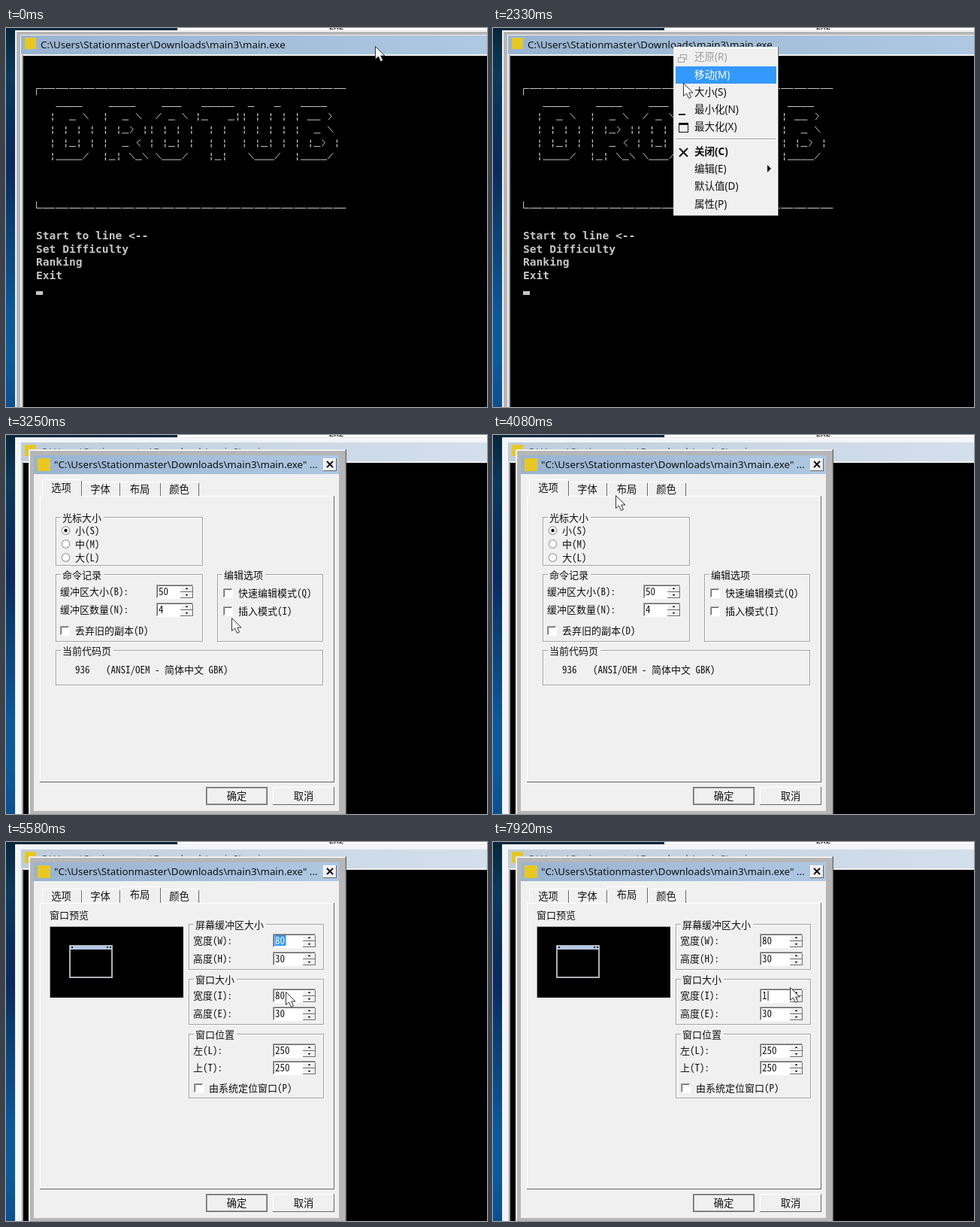
Write an HTML page with a canvas that moves like this. It is 640 px wide and 504 px high and loops after 8 s.

```html
<!DOCTYPE html>
<html lang="zh-CN">
<head>
<meta charset="utf-8">
<style>
html, body { margin: 0; overflow: hidden; background: #000; }
canvas { display: block; }
</style>
</head>
<body>
<canvas id="stage" width="640" height="504"></canvas>
<script>
const g = document.getElementById('stage').getContext('2d');
const FACE = '#f0f0f0', LIGHT = '#fff', EDGE = '#b6b6b6', SHADE = '#a0a0a0', DARK = '#666';
const INK = '#101010', TERM = '#c6c6c6', BLUE = '#3399ff', ICON = '#e8c820';
const UI = '"Noto Sans","Noto Sans CJK SC","Noto Sans CJK",sans-serif';
const FORM = '"Noto Sans Mono CJK SC","Noto Sans CJK SC","Noto Sans CJK",monospace';
const PATH = 'C:\\Users\\Stationmaster\\Downloads\\main3\\main.exe';

const BANNER = [
  '   ____    ____    ___   _____  _   _   ____',
  '  |  _ \\  |  _ \\  / _ \\ |_   _|| | | | | __ )',
  '  | | | | | |_) || | | |  | |  | | | | |  _ \\',
  '  | |_| | |  _ < | |_| |  | |  | |_| | | |_) |',
  '  |____/  |_| \\_\\ \\___/   |_|   \\___/  |____/'
];
const MENU = [
  [38, '还原(R)'], [62, '移动(M)'], [85, '大小(S)'], [108, '最小化(N)'], [131, '最大化(X)'],
  [164, '关闭(C)'], [187, '编辑(E)'], [210, '默认值(D)'], [234, '属性(P)']
];
// pointer tip: time, x, y
const TRACK = [
  [0, 491, 24], [250, 494, 42], [417, 494, 42], [1415, 240, 24],
  [2167, 240, 24], [2915, 300, 243], [3417, 300, 243], [4083, 163, 80], [4250, 180, 73],
  [4750, 180, 72], [5583, 372, 199], [6083, 305, 199], [6167, 305, 199],
  [6666, 338, 198], [6833, 400, 230], [7000, 435, 202], [7833, 398, 195], [7915, 395, 193]
];

function pointerAt(t) {
  const i = TRACK.findIndex(k => k[0] > t);
  if (i < 0) return TRACK[TRACK.length - 1].slice(1);
  const [t0, x0, y0] = TRACK[i - 1], [t1, x1, y1] = TRACK[i];
  const f = (t - t0) / (t1 - t0);
  return [Math.round(x0 + (x1 - x0) * f), Math.round(y0 + (y1 - y0) * f)];
}

function rect(x, y, w, h, color) {
  g.fillStyle = color;
  g.fillRect(x, y, w, h);
}

function frame(x, y, w, h, color) {
  g.strokeStyle = color;
  g.lineWidth = 1;
  g.strokeRect(x + .5, y + .5, w - 1, h - 1);
}

function bevel(x, y, w, h, fill, topLeft, bottomRight) {
  rect(x, y, w, h, bottomRight);
  rect(x, y, w - 1, h - 1, topLeft);
  rect(x + 1, y + 1, w - 2, h - 2, fill);
}

function line(points, color, width = 1) {
  g.strokeStyle = color;
  g.lineWidth = width;
  g.beginPath();
  points.forEach(([x, y]) => g.lineTo(x, y));
  g.stroke();
}

// y is the vertical middle of the line
function text(s, x, y, font, color = INK, align = 'left') {
  g.font = font;
  g.fillStyle = color;
  g.textAlign = align;
  g.fillText(s, x, y + 5);
}

const label = (s, x, y, color) => text(s, x, y, '13px ' + FORM, color);

function titleBar(x, y, w, h, active) {
  const grad = g.createLinearGradient(x, 0, x + w, 0);
  grad.addColorStop(0, active ? '#99b4d1' : '#bfcddb');
  grad.addColorStop(1, active ? '#aec8e2' : '#d3dfec');
  rect(x, y, w, h, grad);
}

function desktop() {
  const grad = g.createLinearGradient(0, 0, 0, 504);
  ['#06263c', '#0a3a5c', '#08305c', '#0a2a60', '#083e70', '#0a4a84', '#0a589c', '#0a5a9e', '#0a5090']
    .forEach((c, i) => grad.addColorStop(i / 8, c));
  rect(0, 0, 640, 504, grad);
  rect(228, 0, 412, 3, '#fff');
  text('zxz', 430, -3, '13px ' + UI);
}

function banner() {
  const cw = 8.8;
  BANNER.forEach((row, r) => {
    const b = 104.5 + r * 17.65;
    [...row].forEach((c, i) => {
      const x = 40 + i * cw, m = x + cw / 2;
      if (c === '_') line([[x, b], [x + cw, b]], TERM);
      if (c === '/') line([[x + 1, b - 1], [x + 8, b - 9]], TERM);
      if (c === '\\') line([[x + 1, b - 9], [x + 8, b - 1]], TERM);
      if (c === '|') {
        line([[m, b - 9], [m, b - 5]], TERM, 1.3);
        line([[m, b - 3], [m, b + 1]], TERM, 1.3);
      }
      if (c === ')') line([[x + 2, b - 9], [x + 6, b - 5], [x + 2, b]], TERM);
      if (c === '<') line([[x + 7, b - 9], [x + 2, b - 5], [x + 7, b]], TERM);
    });
  });
}

function consoleWindow(active) {
  const edge = active ? EDGE : '#f2f5fa';
  rect(12, 3, 628, 501, '#e3e3e3');
  rect(13, 4, 627, 500, LIGHT);
  rect(14, 5, 626, 499, edge);
  rect(19, 9, 621, 495, FACE);
  titleBar(20, 10, 620, 25, active);
  rect(21, 35, 619, 2, FACE);
  rect(21, 36, 2, 468, SHADE);
  rect(23, 37, 617, 467, '#000');
  rect(25, 13, 15, 15, ICON);
  text(PATH, 46, 22, '13.3px ' + UI, active ? INK : '#434e54');

  for (const [y, d] of [[80.5, 9], [239.5, -9]]) {
    line([[40.5, y + d], [40.5, y], [48, y]], TERM);
    for (let x = 48.8; x < 445; x += 17.6) line([[x, y], [x + 16.4, y]], TERM);
  }
  banner();
  ['Start to line <--', 'Set Difficulty', 'Ranking', 'Exit'].forEach((s, i) =>
    text(s, 40, 276 + i * 17.65, 'bold 14.6px "DejaVu Sans Mono",monospace', TERM));
  rect(40, 350, 9, 5, TERM);
}

function menu(px, py, alpha) {
  g.globalAlpha = alpha;
  bevel(240, 25, 140, 225, FACE, '#e3e3e3', DARK);
  frame(241, 26, 138, 223, LIGHT);
  MENU.forEach(([y, s], i) => {
    const last = i === MENU.length - 1;
    const hot = i > 0 && px >= 242 && Math.abs(py - (last ? 238 : y)) < (last ? 16 : 11.6);
    if (hot) rect(243, y - 11, 134, 23, BLUE);
    text(s, 268, y, (i === 5 ? 'bold ' : '') + '13.5px ' + UI, hot ? '#fff' : i ? INK : SHADE);
  });
  frame(249, 35, 9, 7, SHADE);
  bevel(246, 39, 9, 7, FACE, SHADE, SHADE);
  rect(247, 114, 9, 2, INK);
  frame(247, 126, 13, 13, INK);
  rect(247, 126, 13, 3, INK);
  line([[248, 160], [259, 171]], INK, 2);
  line([[259, 160], [248, 171]], INK, 2);
  rect(244, 147, 132, 1, SHADE);
  rect(244, 148, 132, 1, LIGHT);
  g.fillStyle = INK;
  g.beginPath();
  g.moveTo(365, 182);
  g.lineTo(370, 187);
  g.lineTo(365, 192);
  g.fill();
  g.globalAlpha = 1;
}

function group(x, y, w, h, s) {
  frame(x + 1, y + 1, w, h, LIGHT);
  frame(x, y, w, h, SHADE);
  rect(x + 7, y - 2, [...s].length * 13 + 5, 5, FACE);
  label(s, x + 9, y + 1);
}

function sunken(x, y, w, h) {
  bevel(x, y, w, h, '#fff', SHADE, LIGHT);
  line([[x + 1.5, y + h - 2], [x + 1.5, y + 1.5], [x + w - 2, y + 1.5]], DARK);
}

function spin(x, y, w, value, selected = 0, caret = false) {
  sunken(x, y - 9, w, 19);
  for (const [top, d] of [[y - 7, -1], [y + 1, 1]]) {
    bevel(x + w - 18, top, 17, 8, FACE, LIGHT, DARK);
    rect(x + w - 11, top + 3, 3, 1, INK);
    rect(x + w - 10, top + 3 + d, 1, 1, INK);
  }
  const from = value.length - selected;
  if (selected) rect(x + 2.5 + from * 6.5, y - 7, selected * 6.5 + 2, 14, BLUE);
  [...value].forEach((c, i) => label(c, x + 3 + i * 6.5, y, selected && i >= from ? '#fff' : INK));
  if (caret) rect(x + 4 + value.length * 6.5, y - 6, 1, 13, INK);
}

function checkbox(x, y, s) {
  sunken(x, y - 6, 13, 13);
  label(s, x + 20, y);
}

function radio(y, s, on) {
  g.fillStyle = '#fff';
  g.strokeStyle = SHADE;
  g.lineWidth = 1.2;
  g.beginPath();
  g.arc(79.5, y, 5.3, 0, 7);
  g.fill();
  g.stroke();
  if (on) {
    g.fillStyle = INK;
    g.beginPath();
    g.arc(79.5, y, 2.2, 0, 7);
    g.fill();
  }
  label(s, 92, y);
}

function button(x, s, main) {
  bevel(x, 468, 82, 24, FACE, LIGHT, DARK);
  frame(x + 1, 469, 80, 22, main ? SHADE : FACE);
  if (main) frame(x, 468, 82, 24, DARK);
  text(s, x + 41, 480, '13.3px ' + FORM, INK, 'center');
}

function optionsPage() {
  group(66, 109, 196, 65, '光标大小');
  radio(127, '小(S)', true);
  radio(145, '中(M)');
  radio(163, '大(L)');
  group(66, 185, 196, 90, '命令记录');
  label('缓冲区大小(B):', 72, 208);
  label('缓冲区数量(N):', 72, 232);
  spin(200, 208, 50, '50');
  spin(200, 232, 50, '4');
  checkbox(72, 260, '丢弃旧的副本(D)');
  group(281, 185, 141, 90, '编辑选项');
  checkbox(289, 210, '快速编辑模式(Q)');
  checkbox(289, 234, '插入模式(I)');
  group(66, 286, 356, 47, '当前代码页');
  label('936', 92, 312);
  label('(ANSI/OEM - 简体中文 GBK)', 133, 312);
}

function layoutPage(t, px) {
  label('窗口预览', 58, 97);
  bevel(58, 112, 179, 96, '#000', SHADE, LIGHT);
  g.strokeStyle = '#b0b0b8';
  g.lineWidth = 2;
  g.strokeRect(85, 138, 56, 42);
  rect(85, 138, 56, 5, '#b4c8e4');
  for (const x of [87, 134, 138]) rect(x, 139, 2, 2, INK);

  const focusSize = t >= 5660, typed = t >= 7575;
  const picked = t >= 6080 || px < 361 ? 2 : px < 367 ? 1 : 0;
  group(243, 109, 180, 61, '屏幕缓冲区大小');
  label('宽度(W):', 249, 131);
  label('高度(H):', 249, 155);
  spin(355, 131, 58, '80', focusSize ? 0 : 2);
  spin(355, 155, 58, '30');
  group(243, 182, 180, 61, '窗口大小');
  label('宽度(I):', 249, 204);
  label('高度(E):', 249, 228);
  spin(355, 204, 58, typed ? '1' : '80', focusSize && !typed ? picked : 0, typed);
  spin(355, 228, 58, '30');
  group(243, 255, 180, 86, '窗口位置');
  label('左(L):', 249, 277);
  label('上(T):', 249, 300);
  spin(355, 277, 58, '250');
  spin(355, 300, 58, '250');
  checkbox(250, 327, '由系统定位窗口(P)');
}

function tabs(selected) {
  const edges = [48, 101, 152, 206, 257];
  ['选项', '字体', '布局', '颜色'].forEach((s, i) => {
    const on = i === selected, x = edges[i], w = edges[i + 1] - x, y = on ? 59 : 62;
    rect(x, y, w, 82 - y, FACE);
    rect(x, y, w - 1, 1, LIGHT);
    rect(x, y + 1, 1, 80 - y, LIGHT);
    rect(x + w - 1, y + 2, 1, 79 - y, DARK);
    rect(x, 81, w, 1, on ? FACE : LIGHT);
    text(s, x + w / 2 - 1, on ? 70 : 72, '13.3px ' + FORM, INK, 'center');
  });
}

function dialog(t, px) {
  rect(30, 19, 423, 485, DARK);
  rect(30, 19, 422, 485, '#e3e3e3');
  rect(31, 20, 421, 484, SHADE);
  rect(31, 20, 420, 484, LIGHT);
  rect(32, 21, 419, 483, EDGE);
  rect(37, 27, 406, 473, FACE);
  titleBar(37, 27, 406, 25, true);
  rect(42, 31, 17, 17, ICON);
  text('"' + PATH + '" ...', 64, 39, '13.3px ' + UI);
  bevel(422, 31, 18, 17, FACE, LIGHT, DARK);
  line([[427, 35], [435, 43]], INK, 2);
  line([[435, 35], [427, 43]], INK, 2);
  bevel(45, 81, 392, 381, FACE, LIGHT, DARK);
  const layout = t >= 4330;
  tabs(layout ? 2 : 0);
  if (layout) layoutPage(t, px);
  else optionsPage();
  button(266, '确定', true);
  button(355, '取消');
}

function pointer(x, y) {
  g.beginPath();
  [[0, 0], [0, 17], [4, 13.5], [7, 20], [10, 18.6], [7.2, 12.5], [12.5, 12.5]]
    .forEach(([dx, dy]) => g.lineTo(x + dx + .5, y + dy + .5));
  g.closePath();
  g.fillStyle = '#fff';
  g.fill();
  g.strokeStyle = '#333';
  g.lineWidth = 1;
  g.stroke();
}

function draw(now) {
  // the screen refreshes twelve times a second
  const t = Math.floor((now % 8000 + 5) * .012) / .012;
  const [px, py] = pointerAt(t);
  const open = t >= 3249;
  desktop();
  consoleWindow(!open);
  if (open) dialog(t, px);
  else if (t >= 1749) menu(px, py, t < 1830 ? .6 : 1);
  pointer(px, py);
  requestAnimationFrame(draw);
}
requestAnimationFrame(draw);
</script>
</body>
</html>
```
